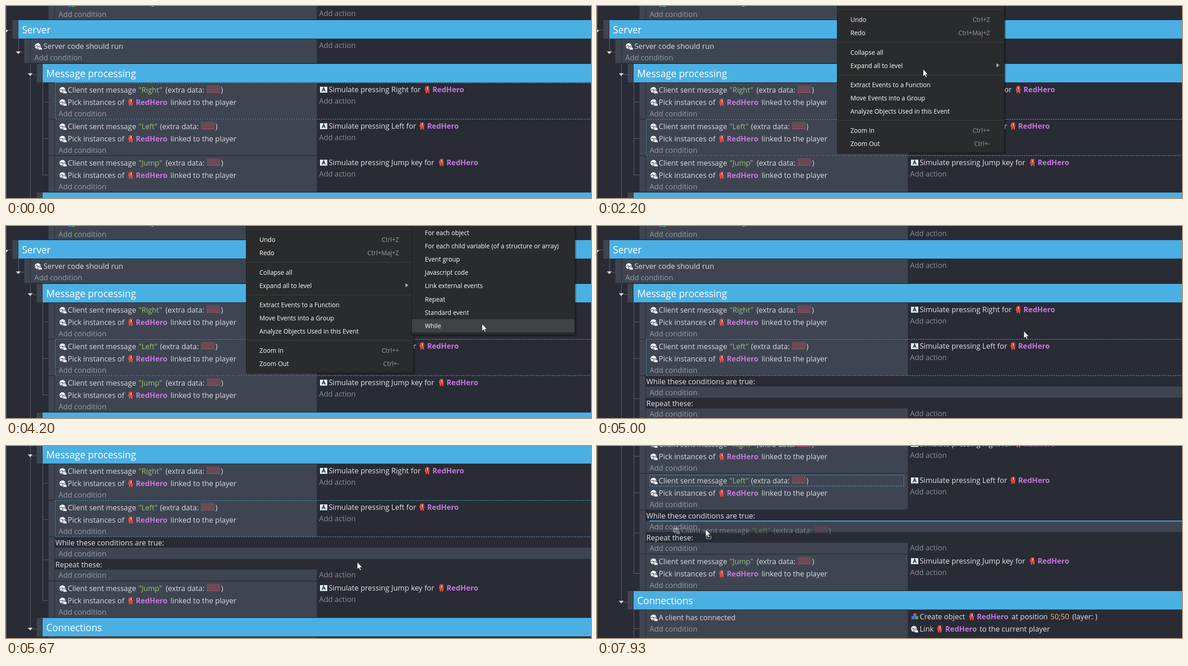
An HTML page that plays this animation: 1280 px wide and 421 px high, repeating every 8000 ms.

```html
<!DOCTYPE html>
<html lang="en">
<head>
<meta charset="utf-8">
<title>Event sheet</title>
<style>
html, body { margin: 0; width: 100%; height: 100%; overflow: hidden; background: #292b35; }
svg { display: block; width: 100vw; height: 100vh; }
text { font: 16.1px "Open Sans", "Noto Sans", sans-serif; fill: #d9dbdf; white-space: pre; }
.add { fill: #969ba4; }
.act { fill: #e2e3e6; }
.dim { fill: #8b8d96; }
.str { fill: #98c379; }
.num { fill: #f0bd6a; }
.obj { fill: #c678dd; font-weight: 700; }
.head { font-size: 21px; fill: #fff; }
.menu { font-size: 13.65px; fill: #fff; }
.key { font-size: 13.65px; fill: #9c9d9e; text-anchor: end; }
.tree { stroke: #666a74; fill: none; }
.dash { fill: none; stroke: #55b9dc; stroke-dasharray: 3 2; }
</style>
</head>
<body>
<svg id="stage" viewBox="0 0 1280 421" preserveAspectRatio="none"></svg>
<script>
const CELL = '#3e4551', BLUE = '#4ab0e4', LOOP = 8000, STEP = 200 / 3;
const WHILE_HEIGHT = 97;

const rect = (x, y, w, h, fill, more = '') =>
  `<rect x="${x}" y="${y}" width="${w}" height="${h}" fill="${fill}" ${more}/>`;
const text = (x, y, s, cls = '') => `<text x="${x}" y="${y}" class="${cls}">${s}</text>`;
const path = (d, more) => `<path d="${d}" ${more}/>`;
const group = (id, body, more = '') => `<g id="${id}" ${more}>${body}</g>`;
const tree = d => path(d, 'class="tree"');
const at = (x, y, body) => `<g transform="translate(${x} ${y})">${body}</g>`;

// Icons are placed by their left edge and the text baseline.
const netIcon = (x, y) => at(x, y,
  '<circle cx="6.5" cy="-6" r="6.5" fill="#fff"/>' +
  path('M1 -5Q4 -8 7 -6T12 -8M7 -6L5 0', `stroke="${CELL}" fill="none" stroke-width="1.2"`) +
  path('M8 2V-1Q9 -4 12 -4T16 -1V2Z', `fill="#fff" stroke="${CELL}" stroke-width=".8"`));
const heroIcon = (x, y) => at(x, y,
  path('M1 -8Q1 -14 6 -14T11 -8L10 -2V2H7V-1H5V2H2V-3L0 -5Z', 'fill="#e04b43"') +
  rect(6, -11, 4, 4, '#f5e9e6') + rect(8, -11, 2, 4, '#28242c'));
const keyIcon = (x, y) => at(x, y, rect(0, -12, 16, 13, '#e9eef4') +
  path('M4.5 -1.5L8 -10L11.5 -1.5M6 -4.5H10', 'fill="none" stroke="#29486b" stroke-width="2"'));
const cubesIcon = (x, y) => at(x, y, rect(4, -13, 7, 7, '#d94848', 'rx="1"') +
  rect(0, -7, 7, 7, '#3f78d0', 'rx="1"') + rect(8, -7, 7, 7, '#42a85b', 'rx="1"'));

const arrow = (x, y) => path(`M${x - 5.5} ${y - 2.5}h11l-5.5 6z`, 'fill="#d5d7db"');
const header = (x, y, title) => rect(x - 13, y, 12, 40.5, CELL) +
  rect(x, y, 1280 - x, 40.5, BLUE) + text(x + 8, y + 29, title, 'head');
const cell = (x, y, h) => rect(x - 14, y, 13, h, CELL) + rect(x, y, 680 - x, h, CELL);
const addCondition = (x, y) => text(x, y, 'Add condition', 'add');
const addAction = y => text(685, y, 'Add action', 'dim');

const message = (y, name, x) => netIcon(117, y) + text(135, y, 'Client sent message') +
  text(290, y, `"${name}"`, 'str') + text(x, y, '(extra data:') +
  rect(x + 89.5, y - 16, 30, 16, '#6b4a56') +
  path(`M${x + 90} ${y - .5}h29`, 'stroke="#e0636d" stroke-dasharray="3 2"') +
  text(x + 121, y, ')');

function messageRow(y, name, x, key, heroX) {
  return cell(107, y, 78.5) + tree(`M80 ${y + 41.5}h13`) +
    message(y + 21, name, x) +
    netIcon(117, y + 48) + text(135, y + 48, 'Pick instances of') +
    heroIcon(267, y + 48) + text(284, y + 48, 'RedHero', 'obj') +
    text(360, y + 48, 'linked to the player') + addCondition(115, y + 73) +
    keyIcon(687, y + 20) + text(706, y + 20, `Simulate pressing ${key} for`, 'act') +
    heroIcon(heroX, y + 20) + text(heroX + 17, y + 20, 'RedHero', 'obj') + addAction(y + 45);
}

function connectionRow(y) {
  return cell(107, y, 80) + tree(`M80.5 ${y}v90M80 ${y + 40.5}h13`) +
    netIcon(117, y + 22) + text(135, y + 22, 'A client has connected') + addCondition(115, y + 47) +
    cubesIcon(688, y + 20) + text(706, y + 20, 'Create object', 'act') +
    heroIcon(814, y + 20) + text(831, y + 20, 'RedHero', 'obj') +
    text(907, y + 20, 'at position', 'act') + text(992, y + 20, '50;50', 'num') +
    text(1040, y + 20, '(layer: )', 'act') +
    netIcon(687, y + 47) + text(706, y + 47, 'Link', 'act') +
    heroIcon(744, y + 47) + text(762, y + 47, 'RedHero', 'obj') +
    text(837, y + 47, 'to the current player', 'act') + addAction(y + 72);
}

const whileRow = y => rect(93, y, 13, 95.5, CELL) + tree(`M80 ${y + 49.5}h13`) +
  text(108, y + 18, 'While these conditions are true:', 'act') +
  rect(107, y + 23, 1173, 24.5, CELL) + addCondition(115, y + 42) +
  text(108, y + 66, 'Repeat these:', 'act') +
  rect(107, y + 71, 573, 24.5, CELL) + addCondition(115, y + 89) + addAction(y + 88);

const sheet =
  cell(107, -60, 89.5) + heroIcon(118, -3) + cubesIcon(136, 2) + heroIcon(160, -3) +
  text(270, -3, 'moving') + addCondition(115, 24) + heroIcon(838, -2) + addAction(22) +
  tree('M80.5 -60V0') +
  header(27, 31, 'Server') + arrow(0, 55) + tree('M6 52.5h8') +
  cell(54, 73, 52) + netIcon(63, 94) + text(82, 94, 'Server code should run') +
  addCondition(62, 119) + addAction(92) +
  tree('M27.5 72V101M33 101.5h7') + arrow(27, 102) +
  tree('M53.5 127V428M58 150.5h9M80.5 168V370') +
  header(80, 127, 'Message processing') + arrow(53, 150) +
  messageRow(169, 'Right', 349, 'Right', 916) +
  messageRow(249, 'Left', 337, 'Left', 904.5) +
  group('loopRow', whileRow(329)) +
  group('lower',
    tree('M53.5 320V432M58 433.5h9M80.5 270V370') +
    messageRow(329, 'Jump', 349.5, 'Jump key', 947) +
    header(80, 409, 'Connections') + arrow(53, 433) + connectionRow(451));

const mainItems = [
  [30, 'Undo', 'Ctrl+Z'], [59, 'Redo', 'Ctrl+Maj+Z'], [102, 'Collapse all'],
  [131, 'Expand all to level'], [173, 'Extract Events to a Function'],
  [202, 'Move Events into a Group'], [231, 'Analyze Objects Used in this Event'],
  [273, 'Zoom In', 'Ctrl++'], [302, 'Zoom Out', 'Ctrl+-']
];
const subItems = ['For each object', 'For each child variable (of a structure or array)',
  'Event group', 'Javascript code', 'Link external events', 'Repeat', 'Standard event', 'While'
].map((s, i) => [15 + i * 29.1, s]);

const menu = (id, x, w, h, items, extra = '') => group(id,
  rect(x + 2, -10, w + 1, h + 13, '#000', 'opacity=".25"') +
  rect(x + .5, -10, w - 1, h + 9.5, '#292b2c', 'stroke="#1b1c1f"') +
  rect(x + 1, 0, w - 2, 29, '#414243', `id="${id}Hover"`) + extra +
  items.map(([y, label, key]) => text(x + 29.5, y + 5, label, 'menu') +
    (key ? text(860, y + 5, key, 'key') : '')).join(''));

const stage = document.getElementById('stage');
stage.innerHTML = rect(0, 0, 1280, 421, '#292b35') +
  tree('M.5 0V421') +
  group('sheet', sheet) +
  rect(115, 64, 557, 24, '#3a3f4a', 'id="hover"') +
  group('hoverText', message(82, 'Left', 337)) +
  rect(107.5, 0, 1190, 79.5, 'none', 'id="rowFrame" class="dash"') +
  rect(115.5, 63.5, 556, 24.5, 'none', 'id="itemFrame" class="dash"') +
  path('', `id="dropLine" stroke="${BLUE}" stroke-width="2"`) +
  group('ghost', message(82, 'Left', 337), 'opacity=".4"') +
  menu('mainMenu', 525, 367, 322, mainItems,
    path('M526 7.5H890M526 79.5H890M526 151.5H890M526 250.5H890', 'stroke="#404142"') +
    path('M874 125.5v9l6.5 -4.5z', 'fill="#a7a8a9"')) +
  menu('subMenu', 887, 358, 239, subItems) +
  group('cursor',
    path('M.5 .5V16.5L4.1 13.2 6.6 18.8 9 17.8 6.6 12.2H11.6Z', 'fill="#fff" stroke="#111" stroke-width=".8"') +
    rect(2.5, 15.5, 10, 6, 'none', 'id="dragMark" stroke="#fff" stroke-dasharray="2 1"'));

const el = {};
stage.querySelectorAll('[id]').forEach(n => el[n.id] = n);
const show = (node, on) => node.setAttribute('display', on ? 'inline' : 'none');
const move = (node, x, y) => node.setAttribute('transform', `translate(${x} ${y})`);

// Keys are [time, value, ...]; values are joined linearly.
function track(keys, t) {
  let i = 0;
  while (i < keys.length - 2 && t >= keys[i + 1][0]) i++;
  const a = keys[i], b = keys[i + 1];
  const k = Math.min(1, Math.max(0, (t - a[0]) / (b[0] - a[0])));
  return a.slice(1).map((v, n) => v + (b[n + 1] - v) * k);
}

const pointer = [
  [70, 904, 393], [200, 330, 363], [270, 268, 374], [470, 268, 374],
  [670, 618, 340], [800, 525, 321], [1730, 525, 321], [2200, 713, 138],
  [2470, 790, -30], [3200, 950, -25], [3800, 1015, 160], [4070, 1039, 214],
  [4130, 1040, 214], [4200, 1041, 214], [4870, 1041, 214], [5200, 768, 254],
  [6000, 768, 254], [6270, 948, 190], [6730, 230, 68], [6870, 207, 73],
  [6930, 208, 74], [7400, 208, 74], [7930, 237, 182]
];
const scrolling = [[5240, 0], [5400, 47], [5670, 129], [5870, 188]];

function highlight(node, items, y) {
  const item = items.find(([c]) => Math.abs(y - c) <= 14.5);
  show(node, item);
  if (item) node.setAttribute('y', item[0] - 14.5);
}

function dropTarget(y) {
  if (y >= 164 && y < 189) return 'M115 164.5H1280';
  if (y >= 115 && y < 140) return 'M115 115.5H672';
  if (y >= 90 && y < 115) return 'M115 90.5H672';
  return '';
}

function draw(time) {
  const t = Math.round(Math.floor((time + 4) / STEP) * STEP / 10) * 10;
  const [x, y] = track(pointer, t);
  const [scroll] = track(scrolling, t);
  const added = t >= 4530, dragging = t >= 7470;

  move(el.sheet, 0, -scroll);
  show(el.loopRow, added);
  move(el.lower, 0, added ? WHILE_HEIGHT : 0);

  el.rowFrame.setAttribute('y', (t < 1270 ? 168.5 : 248.5) - scroll);
  show(el.rowFrame, !dragging);
  show(el.itemFrame, dragging);
  const over = scroll === 188 && !dragging && x < 672 && y >= 64 && y < 88;
  show(el.hover, over);
  show(el.hoverText, over);

  show(el.mainMenu, t >= 1270 && t < 4470);
  show(el.subMenu, t >= 2870 && t < 4470);
  const hoverY = track(pointer, t - 33)[1];
  highlight(el.mainMenuHover, t >= 1800 && t < 2470 ? mainItems : [], hoverY);
  highlight(el.subMenuHover, t >= 3270 ? subItems : [], hoverY);

  show(el.cursor, t >= 70);
  move(el.cursor, x, y);
  show(el.dragMark, dragging);
  show(el.ghost, dragging);
  move(el.ghost, x - 188, y - 73);
  el.dropLine.setAttribute('d', dragging ? dropTarget(y) : '');
}

const start = performance.now();
function tick() {
  draw((performance.now() - start) % LOOP);
  requestAnimationFrame(tick);
}
tick();
</script>
</body>
</html>
```
